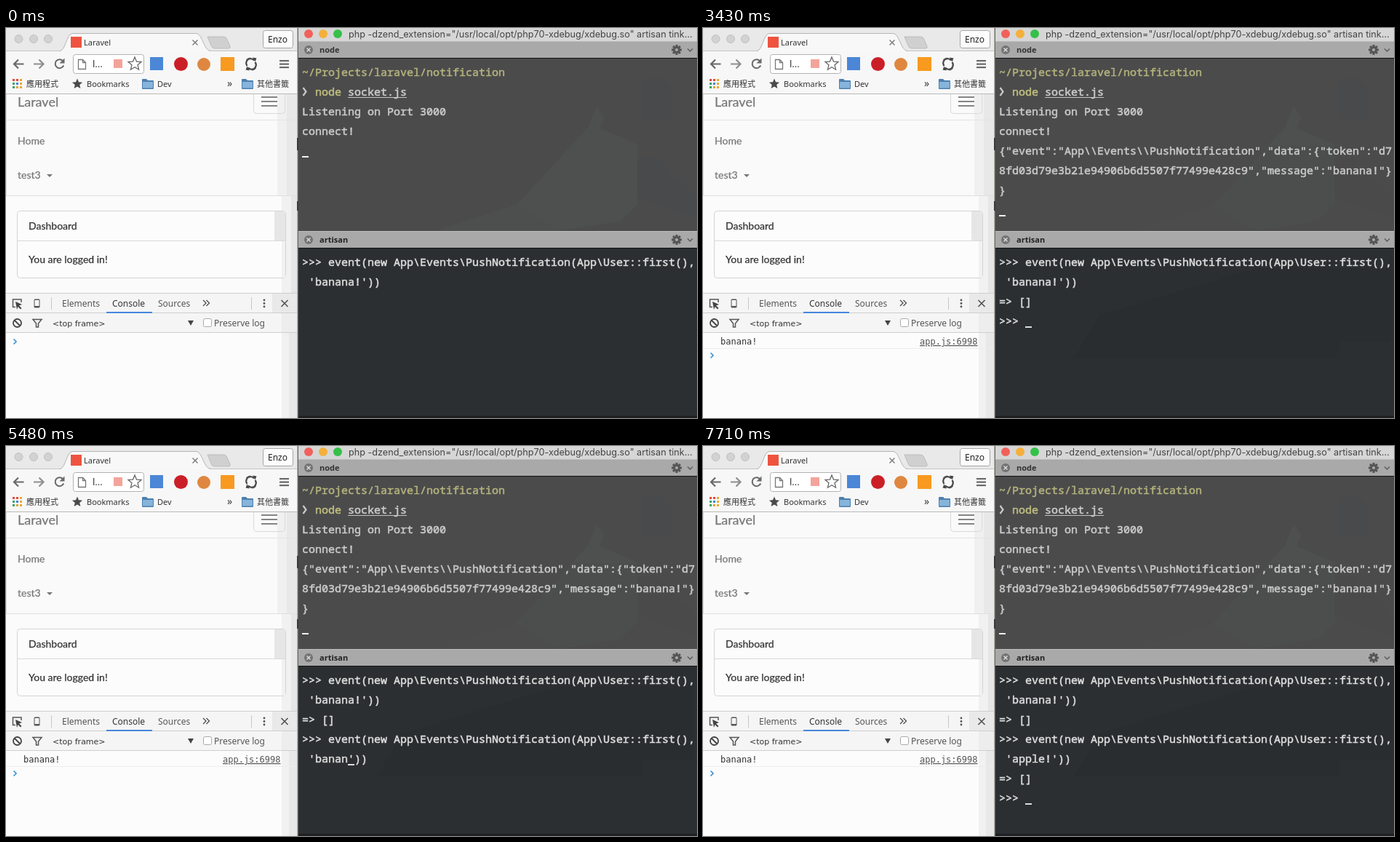
Recreate the animation shown at these times as an HTML page with a canvas. Size 950 px wide and 536 px high, loop 8000 ms.

```html
<!DOCTYPE html>
<html lang="en">
<head>
<meta charset="utf-8">
<title>Push notification demo</title>
<style>
html, body { margin: 0; width: 100%; height: 100%; overflow: hidden; background: #fafafa; }
canvas, svg { position: absolute; left: 0; top: 0; width: 950px; height: 536px; }
text { white-space: pre; }
.ui { font-family: "Noto Sans", "Noto Sans CJK TC", "Noto Sans CJK", sans-serif; }
.page { font-family: Lato, sans-serif; stroke-width: .25px; }
.code { font-family: "DejaVu Sans Mono", monospace; }
.select { font-family: "DejaVu Sans", sans-serif; }
.term { font-family: "Noto Sans Mono", monospace; stroke-width: .55px; }
.title { font-family: Inter, sans-serif; }
</style>
</head>
<body>
<canvas id="stage" width="950" height="536"></canvas>
<svg id="words" viewBox="0 0 950 536"></svg>
<script>
const g = document.getElementById('stage').getContext('2d');
const words = document.getElementById('words');
const CELL = 9, ROW = 27, LEFT = 407, LOOP = 8000;

function label(str, x, y, size, fill, kind = 'ui', bold) {
  const el = document.createElementNS('http://www.w3.org/2000/svg', 'text');
  el.setAttribute('x', x);
  el.setAttribute('y', y);
  el.setAttribute('font-size', size);
  el.setAttribute('fill', fill);
  el.setAttribute('class', kind);
  // Heavier strokes for the page and terminal faces
  if (kind === 'page' || kind === 'term') el.setAttribute('stroke', fill);
  if (bold) el.style.fontWeight = 700;
  el.textContent = str;
  words.append(el);
  return el;
}

function rect(x, y, w, h, fill) {
  g.fillStyle = fill;
  g.fillRect(x, y, w, h);
}

function box(x, y, w, h, r, fill, stroke) {
  g.beginPath();
  g.roundRect(x + .5, y + .5, w - 1, h - 1, r);
  if (fill) { g.fillStyle = fill; g.fill(); }
  if (stroke) { g.strokeStyle = stroke; g.lineWidth = 1; g.stroke(); }
}

function disc(x, y, r, fill, stroke) {
  g.beginPath();
  g.arc(x, y, r, 0, 7);
  if (fill) { g.fillStyle = fill; g.fill(); }
  if (stroke) { g.strokeStyle = stroke; g.lineWidth = 1; g.stroke(); }
}

function shape(d, fill) {
  g.fillStyle = fill;
  g.fill(new Path2D(d));
}

function line(d, stroke, width = 1) {
  g.strokeStyle = stroke;
  g.lineWidth = width;
  g.stroke(new Path2D(d));
}

function star(x, y, r, fill, stroke) {
  g.beginPath();
  for (let i = 0; i < 10; i++) {
    const a = i * Math.PI / 5 - Math.PI / 2, k = i % 2 ? r * .45 : r;
    g.lineTo(x + k * Math.cos(a), y + k * Math.sin(a));
  }
  g.closePath();
  if (fill) { g.fillStyle = fill; g.fill(); }
  if (stroke) { g.strokeStyle = stroke; g.lineWidth = 1.3; g.stroke(); }
}

function folder(x, y) {
  shape(`M${x} ${y + 1}q0-1 1-1h5l2 2h7q1 0 1 1v10q0 1-1 1h-14q-1 0-1-1z`, '#4d7fae');
  rect(x + 1, y + 4, 14, 8.5, '#86b4da');
}

function gear(x, y) {
  g.save();
  g.translate(x, y);
  for (let i = 0; i < 8; i++) {
    rect(-1.5, -7, 3, 4, '#555');
    g.rotate(Math.PI / 4);
  }
  g.restore();
  disc(x, y, 5, '#555');
  disc(x, y, 2, '#aaa');
}

function drawTabs() {
  rect(0, 0, 400, 32, '#e9e9e9');
  [17.5, 38, 58].forEach(x => disc(x, 15, 5.5, '#d2d2d2', '#c0c0c0'));
  rect(0, 31, 400, 1, '#c4c4c4');
  const tab = 'M74 31.5C82 31 83 8.5 91 7.5H262C270 8.5 272 31 281 31.5';
  shape(tab, '#f8f8f8');
  line(tab, '#b5b5b5');
  rect(76, 31, 203, 1, '#f8f8f8');
  const plus = 'M277 12h22q4 0 5 4l4 9q1 3-2 3h-19q-4 0-5-4z';
  shape(plus, '#d0d0d0');
  line(plus, '#bcbcbc');
  rect(89, 12, 15, 15, '#ee5340');
  line('M256.5 16.5l7 7m0-7l-7 7', '#777', 1.4);
  box(353, 3, 42, 25, 3, '#fdfdfd', '#a5a5a5');
}

function drawToolbar() {
  rect(0, 32, 400, 59, '#f7f7f7');
  line('M24.5 49.5H11.5M17 43.5l-6 6l6 6', '#696969', 2.2);
  line('M38 49.5h13M45.5 43.5l6 6l-6 6', '#8e8e8e', 2.2);
  line('M78 45A6 6 0 1 0 79.2 51.5', '#696969', 2);
  shape('M80.5 41.5v7h-7z', '#696969');
  box(92, 36, 98, 27, 3, '#fff', '#b2b2b2');
  line('M99.5 43.5h6l4 4v9h-10zM105.5 43.5v4h4', '#777', 1.3);
  rect(148, 43, 12, 12, '#f3a49a');
  star(177, 49.5, 9.5, null, '#666');
  rect(198, 40, 18, 18, '#4b87d6');
  disc(240.5, 49.5, 9.5, '#cb1f28');
  disc(272, 50, 9, '#df8740');
  rect(295, 40, 19, 19, '#f89a20');
  line('M331.5 52A6 6 0 0 1 341 44.5M342.5 47A6 6 0 0 1 333 54.5', '#444', 2.2);
  shape('M339 40.5l5.5 1l-2 5zM335 58.5l-5.5-1l2-5z', '#444');
  line('M330.5 44A8 8 0 0 1 336 41.2M343.5 55A8 8 0 0 1 338 57.8', '#555', 1.6);
  for (let i = 0; i < 3; i++) rect(376, 44 + i * 4.5, 13, 2.2, '#696969');

  const dots = ['#e34a3c', '#e34a3c', '#eaa92f', '#39a269', '#4285d8', '#eaa92f', '#39a269', '#e0a530', '#eaa92f'];
  dots.forEach((c, i) => rect(9 + i % 3 * 5, 70 + Math.floor(i / 3) * 5, 3, 3, c));
  star(98, 77, 7.5, '#4a4a4a');
  folder(187, 70);
  folder(324, 70);
  rect(0, 90, 400, 1, '#b9b9b9');
}

function drawPage() {
  rect(0, 91, 400, 274, '#fbfbfb');
  rect(0, 91, 400, 140, '#fafafa');
  rect(373, 91, 14, 140, '#f0f0f0');
  rect(386, 91, 14, 140, '#e8e8e8');
  rect(379, 231, 13, 133, '#f1f1f1');
  rect(392, 231, 8, 133, '#e6e6e6');
  rect(0, 126, 400, 1, '#e4e4e4');
  rect(0, 230, 400, 1, '#dfdfdf');
  rect(0, 91, 1, 140, '#e0e0e0');
  g.save();
  g.beginPath();
  g.rect(330, 91, 70, 40);
  g.clip();
  box(340, 83, 44, 35, 4, null, '#d9d9d9');
  g.restore();
  for (let y = 94; y < 108; y += 6) rect(351, y, 22, 2, '#858585');
  shape('M56 201h8l-4 4z', '#777');
  box(15, 251, 370, 93, 4, '#fcfcfc', '#d4d4d4');
  rect(369, 252, 15, 40, '#e6e6e6');
  rect(379, 293, 5, 50, '#f1f1f1');
  rect(16, 292, 368, 1, '#d9d9d9');
}

function drawDevtools() {
  rect(0, 364, 400, 172, '#fcfcfc');
  rect(0, 365, 400, 53, '#f5f5f5');
  rect(379, 419, 10, 117, '#f1f1f1');
  rect(389, 419, 11, 117, '#e8e8e8');
  rect(366, 365, 34, 26, '#e9e9e9');
  rect(379, 392, 21, 26, '#ededed');
  [364, 391, 418].forEach(y => rect(0, y, 400, 1, '#cfcfcf'));
  rect(138, 390, 63, 2, '#4587dc');
  rect(62, 370, 1, 17, '#c8c8c8');
  rect(337, 370, 1, 17, '#c8c8c8');
  line('M13 383.5H9.5V373H21V377', '#555', 1.5);
  shape('M13 376l9 4l-4 1.5l3.5 3.5l-1.5 1.5l-3.5-3.5l-1.5 4z', '#444');
  box(38, 372, 9, 13, 1.5, '#555');
  rect(39.5, 374, 6, 8, '#f5f5f5');
  [374, 378.5, 383].forEach(y => disc(355, y, 1.4, '#555'));
  line('M378.5 374l9 9m0-9l-9 9', '#555', 1.7);
  line('M271 374l4 4l-4 4M275.5 374l4 4l-4 4', '#555', 1.4);
  line('M21 405.5a5.5 5.5 0 1 0-11 0a5.5 5.5 0 1 0 11 0M11.5 401.5l8 8', '#444', 1.8);
  line('M37 400.5h12l-4.5 5.5v5h-3v-5z', '#555', 1.5);
  shape('M250 402h8l-4 7z', '#444');
  box(271, 399, 12, 12, 2, '#fff', '#a9a9a9');
}

function drawPaneBar(y) {
  rect(402, y, 548, 23, '#a9a9a9');
  rect(402, y, 548, 1, '#bdbdbd');
  rect(402, y + 23, 548, 1, '#111');
  disc(416, y + 12, 6, '#737373');
  line(`M413.5 ${y + 9.5}l5 5m0-5l-5 5`, '#dedede', 1.4);
  gear(922, y + 12);
  line(`M937 ${y + 10.5}l3.500 3.500l3.500-3.500`, '#5a5a5a', 1.4);
}

function drawTerminal(sent) {
  rect(400, 0, 1, 536, '#b5b5b1');
  rect(401, 0, 1, 536, '#6a6a64');
  rect(400, 151, 2, 17, '#3a3a3a');
  rect(400, 238, 2, 13, '#3a3a3a');
  rect(402, 0, 548, 18, '#d6d6d6');
  [['#f1605a', 416], ['#f4b03a', 436], ['#35c04a', 456]].forEach(([c, x]) => disc(x, 8, 6, c));
  rect(402, 41, 548, 238, '#4b4b4c');
  shape('M702 243L800 137L812 108L822 122L816 138L868 160V243L845 265L760 279Z', '#4e5050');
  shape('M702 243L760 279H590Z', '#4d4f4f');
  shape('M874 78q0-10 10-10h16l14 14v43h-40zM868 187q0-9 9-9h17l20 24q32 20 36 40v20l-82-30z', '#494a4b');
  rect(402, 301, 548, 235, '#2b2f31');
  if (sent) {
    rect(402, 161, 548, 118, 'rgba(75, 75, 76, .6)');
    shape('M545 395L510 454H875V431H945V330H760Z', '#2a2d2f');
  }
  rect(402, 533, 548, 3, '#1e2021');
  drawPaneBar(18);
  drawPaneBar(279);
  line('M408.5 82l4 5.5l-4 5.5', '#cacaca', 2.2);
  rect(470, 95, 81, 1, '#c4c4c4');
}

function caret(col, y, fill) {
  rect(LEFT + col * CELL, y, CELL, 2, fill);
}

// Fixed text
label('Laravel', 107, 24, 11, '#333');
label('Enzo', 360, 20, 12, '#222');
label('l...', 119, 54, 13, '#333');
label('應用程式', 28, 81, 11, '#333');
label('Bookmarks', 111, 81, 11, '#333');
label('Dev', 208, 81, 11, '#333');
label('»', 304, 81, 14, '#333');
label('其他書籤', 345, 81, 11, '#333');
label('Laravel', 16, 108, 18, '#777', 'page');
label('Home', 16, 160, 14, '#777', 'page');
label('test3', 16, 207, 14, '#777', 'page');
label('Dashboard', 31, 277, 14, '#333', 'page');
label('You are logged in!', 31, 323, 14, '#333', 'page');
label('Elements', 77, 383, 12, '#555');
label('Console', 146, 383, 12, '#333');
label('Sources', 209, 383, 12, '#555');
label('<top frame>', 64, 410, 11, '#333', 'select');
label('Preserve log', 286, 410, 12, '#555');
label('php -dzend_extension="/usr/local/opt/php70-xdebug/xdebug.so" artisan tink…', 471, 13, 12.65, '#444', 'title');
label('node', 431, 34, 11, '#333', 'ui', true);
label('artisan', 431, 295, 11, '#222', 'ui', true);

const nodeLine = (str, row, col = 0, fill = '#cacaca') =>
  label(str, LEFT + col * CELL, 66 + row * ROW, 15, fill, 'term');
nodeLine('~/Projects/laravel/notification', 0, 0, '#b3b27c');
nodeLine('node', 1, 2, '#bfbd7e');
nodeLine('socket.js', 1, 7);
nodeLine('Listening on Port 3000', 2);
nodeLine('connect!', 3);

// Changing text
const received = [
  '{"event":"App\\\\Events\\\\PushNotification","data":{"token":"d7',
  '8fd03d79e3b21e94906b6d5507f77499e428c9","message":"banana!"}',
  '}'
].map((s, i) => nodeLine(s, 4 + i));
const logged = [
  label('banana!', 24, 435, 12, '#333', 'code'),
  label('app.js:6998', 298, 435, 12, '#555', 'code')
];
logged[1].style.textDecoration = 'underline';

const rows = Array.from({ length: 7 }, (_, i) =>
  label('', LEFT, 327 + i * ROW, 15, '#dcdcdc', 'term'));
const call = '>>> event(new App\\Events\\PushNotification(App\\User::first(),';
const arg = word => ` '${word}'))`;

// Editing the second command: start, word, caret column (-1 hides it)
const edits = [
  [3880, 'banana!', 12], [4330, 'banana!', 11], [4500, 'banana!', 10], [4680, 'banana!', 9],
  [5210, 'banana', 8], [5480, 'banan', 7], [5560, 'ban', 5], [5650, 'b', 3], [5830, '', 2],
  [6090, 'a', 3], [6270, 'ap', 4], [6360, 'app', 5], [6450, 'appl', 6], [6720, 'apple', 7],
  [7170, 'apple', -1], [7350, 'apple!', 8]
];

function shell(t) {
  const text = [call, arg('banana!')];
  if (t < 480) return { text, col: -1, row: 1 };
  if (t < 1460) return { text, col: 12, row: 1 };
  if (t < 1550) return { text, col: 0, row: 2 };
  text.push('=> []');
  if (t < 3880) return { text: [...text, '>>>'], col: 4, row: 3 };
  const [, word, col] = edits.findLast(e => t >= e[0]);
  text.push(call, arg(word));
  if (t < 7710) return { text, col, row: 4 };
  return { text: [...text, '=> []', '>>>'], col: 4, row: 6 };
}

function setText(el, str) {
  if (el.textContent !== str) el.textContent = str;
}

function draw(t) {
  const sent = t >= 3430;
  const { text, col, row } = shell(t);
  drawTabs();
  drawToolbar();
  drawPage();
  drawDevtools();
  drawTerminal(sent);
  const y = sent ? 450 : 431;
  line(`M10.5 ${y - 3.5}l3.5 3.5l-3.5 3.5`, '#3c93d6', 1.7);
  if (sent) rect(0, 440, 400, 1, '#ededed');
  [...received, ...logged].forEach(el => { el.style.display = sent ? '' : 'none'; });
  caret(0, sent ? 257 : 176, '#f0f0f0');
  rows.forEach((el, i) => setText(el, text[i] || ''));
  if (col >= 0) caret(col, 329 + row * ROW, '#dcdcdc');
}

function tick() {
  draw(performance.now() % LOOP);
  requestAnimationFrame(tick);
}
tick();
</script>
</body>
</html>
```
